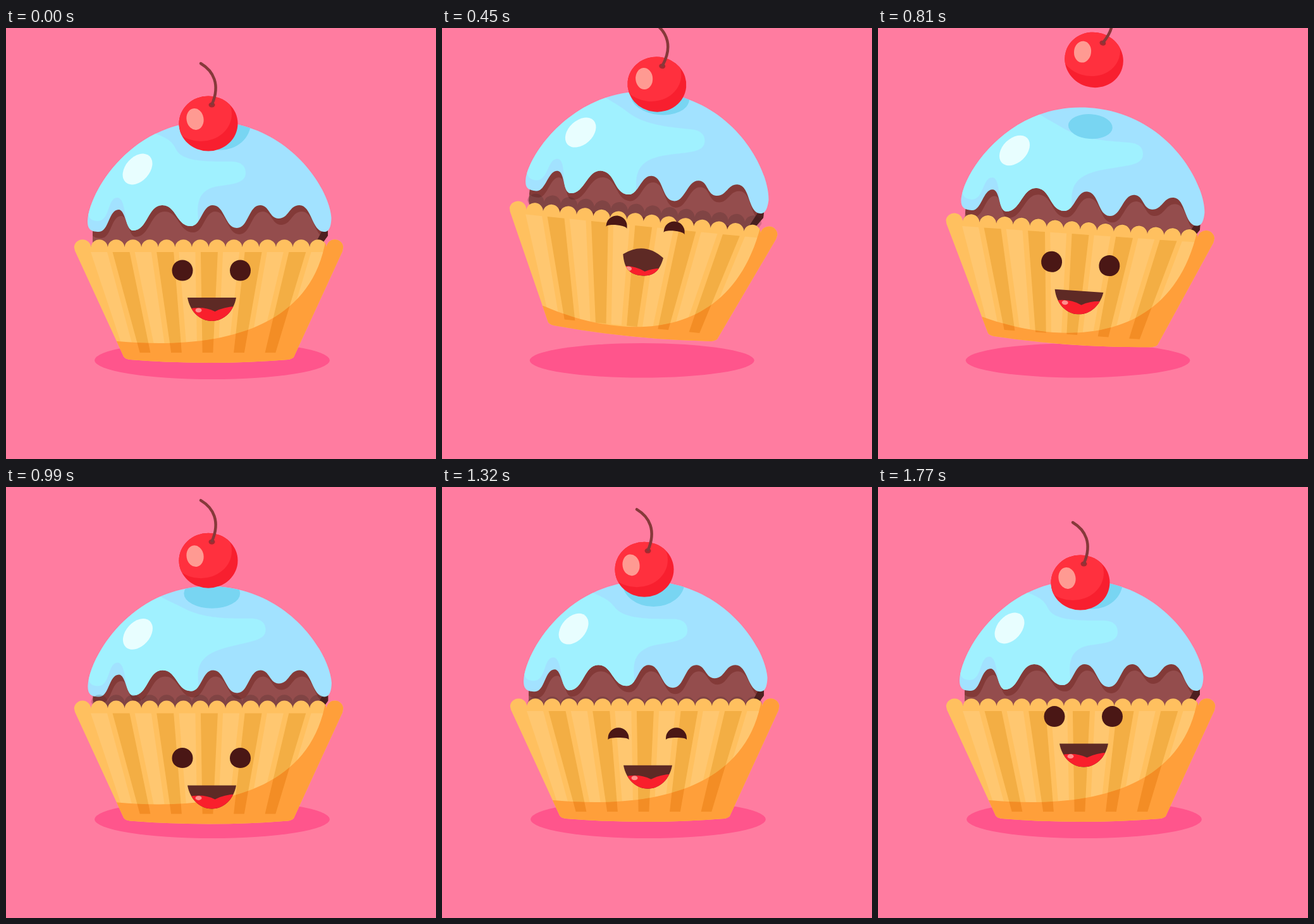
An HTML page for the animation above (1800 ms loop, 680x681 px).

```html
<!DOCTYPE html>
<html lang="en">
<head>
<meta charset="utf-8">
<title>Jumping cupcake</title>
<style>
html, body { margin: 0; width: 100%; height: 100%; overflow: hidden; background: #ff7ca0; }
svg { display: block; width: 100vw; height: 100vh; }
</style>
</head>
<body>
<svg viewBox="0 0 680 681" preserveAspectRatio="none">
  <defs>
    <path id="icing"/>
    <path id="cake" d="M137 305L165 270H480L509 305V328L463 394L444 425H170L152 386L137 338Z"/>
    <clipPath id="inIcing"><use href="#icing"/></clipPath>
    <clipPath id="inCake"><use href="#cake"/></clipPath>
    <clipPath id="inCup"><path class="cupShape"/></clipPath>
    <clipPath id="inShade"><path class="shadeShape"/></clipPath>
    <clipPath id="inMouth"><path class="mouthShape"/></clipPath>
    <clipPath id="inCherry"><ellipse rx="46.5" ry="43.5"/></clipPath>
  </defs>
  <rect width="680" height="681" fill="#ff7ca0"/>
  <ellipse id="ground" fill="#ff558c"/>
  <g id="jump">
    <g id="top">
      <use href="#cake" fill="#944d4d"/>
      <g clip-path="url(#inCake)">
        <use href="#icing" fill="#833a38" x="4" y="10"/>
        <path d="M501 318H520V425H425L478 362Z" fill="#4e2020"/>
      </g>
      <use href="#icing" fill="#a2e2ff"/>
      <g clip-path="url(#inIcing)">
        <path id="gloss" fill="#a0f1ff"/>
        <ellipse id="dent" fill="#78d5f2"/>
      </g>
      <ellipse rx="19" ry="28" transform="translate(208 223) rotate(42)" fill="#e8feff"/>
    </g>
    <g id="print">
      <path id="printShape" fill="#2c1c1c" opacity=".19"/>
      <path class="darkStripes" fill="#500c10" opacity=".32"/>
    </g>
    <path class="cupShape" fill="#ffc05f"/>
    <g clip-path="url(#inCup)">
      <path id="lightStripes" fill="#ffc770"/>
      <path class="darkStripes" fill="#f3ae44"/>
      <path class="shadeShape" fill="#ff9f3a"/>
      <g clip-path="url(#inShade)"><path class="darkStripes" fill="#f38d25"/></g>
    </g>
    <g id="cherry">
      <ellipse rx="46.5" ry="43.5" fill="#f81f2f"/>
      <g clip-path="url(#inCherry)">
        <ellipse cx="-12" cy="-15" rx="49" ry="43" fill="#ff303e"/>
      </g>
      <ellipse cx="-21" cy="-7" rx="13.5" ry="17" transform="rotate(-10 -21 -7)" fill="#ff9a92"/>
      <ellipse cx="5.5" cy="-29.5" rx="5" ry="4" fill="#a52a30"/>
      <path d="M-12 -95C8 -83 19 -62 6 -31" fill="none" stroke="#86393a" stroke-width="4.5" stroke-linecap="round"/>
    </g>
    <g id="face">
      <path class="eye" transform="translate(279 383)" fill="#4a1715"/>
      <path class="eye" transform="translate(370.5 383)" fill="#4a1715"/>
      <g transform="translate(325.5 426)">
        <path class="mouthShape" fill="#5e2a25"/>
        <g clip-path="url(#inMouth)">
          <g id="tongue">
            <path d="M-40 19Q-16 12 5 22Q20 14 40 14V44H-40Z" fill="#f91f2c"/>
            <ellipse cx="-21" cy="20" rx="5" ry="3.5" fill="#ff8f8c"/>
          </g>
        </g>
      </g>
    </g>
  </g>
</svg>
<script>
const LOOP = 1800, STEP = 30;
const byId = id => document.getElementById(id);
const set = (id, attrs) => Object.entries(attrs).forEach(([k, v]) => byId(id).setAttribute(k, v));
const setAll = (cls, d) => document.querySelectorAll('.' + cls).forEach(el => el.setAttribute('d', d));
const move = (id, x, y, turn = 0) => set(id, { transform: `translate(${x} ${y}) rotate(${turn})` });

// Easing from 0 to 1 between two times, and the hills built from it.
function rise(t, from, to) {
  const u = Math.min(1, Math.max(0, (t - from) / (to - from)));
  return u * u * (3 - 2 * u);
}
const plateau = (t, a, b, c, d) => rise(t, a, b) * (1 - rise(t, c, d));
const pulse = (t, a, peak, b) => plateau(t, a, peak, peak, b);
const bounce = (t, mid, half) => Math.max(0, 1 - ((t - mid) / half) ** 2);

// Dome closed by a wavy edge that swings between drips and gaps.
function icingPath() {
  const edge = [[503, 322], [464, 280], [431, 301], [402, 280], [365, 316], [327, 280],
    [292, 313], [247, 280], [201, 320], [178, 287], [147, 322]];
  let d = 'M129 305C131 260 197 147.5 321 147.5C444 147.5 511 251 514.5 300C514 318 509 322 503 322';
  edge.slice(1).forEach(([x, y], i) => {
    const [px, py] = edge[i], mid = (x + px) / 2;
    d += `C${mid} ${py} ${mid} ${y} ${x} ${y}`;
  });
  return d + 'C134 322 129 318 129 305Z';
}

const scallops = count => 'a13.4 13.4 0 0 1 26.6 0'.repeat(count);

// Evenly spaced pleats that converge towards the base.
function stripes(first, count, half) {
  const low = x => 318 + (x - 320) * .71;
  let d = '';
  for (let i = 0; i < count; i++) {
    const x = first + i * 69.7;
    d += `M${x - half} 354H${x + half}L${low(x) + half * .62} 513H${low(x) - half * .62}Z`;
  }
  return d;
}

set('icing', { d: icingPath() });
set('printShape', { d: `M134.3 346${scallops(14)}L462 425H178Z` });
set('lightStripes', { d: stripes(147, 6, 13) });
setAll('darkStripes', stripes(182, 5, 13.5));
setAll('cupShape', `M107.7 346${scallops(16)}L532 353L455 520Q452 523 446 524Q321 534 196 524Q188 523 186 519L109 352Z`);

function drawBodies(t, lift) {
  const shrink = pulse(t, 330, 600, 980) ** 2;
  set('ground', { cx: 326 - 56 * shrink, cy: 525 + 1.5 * shrink, rx: 186 - 49 * shrink, ry: 30 - 16 * shrink });

  const x = 320 - 11.5 * lift ** 2.6, y = 344 - 86 * lift + 4 * pulse(t, 900, 1020, 1160);
  set('jump', { transform: `translate(${x} ${y}) rotate(${12.1 * lift}) translate(-320 -344)` });

  const icing = 6 * pulse(t, 0, 210, 400) - 57 * pulse(t, 410, 600, 780) + 6 * plateau(t, 720, 810, 1170, 1380);
  move('top', .07 * icing, icing);
  move('print', 0, -46 * pulse(t, 360, 600, 810) - 16 * pulse(t, 760, 1170, 1380));

  const tilt = 13 * pulse(t, 480, 800, 960);
  const height = 176 * pulse(t, 390, 660, 930) + 78 * bounce(t, 1140, 210);
  move('cherry', 320 + .3 * tilt, 151 - height, tilt);
}

function drawShading(t, lift) {
  const air = plateau(t, 300, 510, 930, 1530), far = plateau(t, 390, 600, 810, 1100);
  const dx = 32 * air, dy = -13 * air, tip = 379 + dx, mid = 229 + dy;
  set('gloss', { d: `M${215 + dx / 2} 155C${240 + dx / 2} 172 258 170 ${268 + dx / 2} ${190 + dy / 2}
    C${tip - 104} ${mid - 22} ${tip - 79} ${mid - 18} ${tip - 39} ${mid - 18}H${tip - 24}
    C${tip - 7} ${mid - 18} ${tip} ${mid - 11} ${tip} ${mid}
    C${tip} ${mid + 17} ${tip - 24} ${mid + 18} ${335 + dx / 2} ${250 + dy / 2}
    C310 254 300 270 304 300V330H195C188 300 188 268 176 268C160 268 165 305 145 305C135 305 130 300 129 290L110 140Z` });
  set('dent', { cx: 338 - 13 * air, cy: 150 + 27 * far, rx: 49 - 14 * far, ry: 43 - 18 * air - 5.5 * far });

  const sag = Math.sqrt(lift);
  setAll('shadeShape', `M160 494L177 495C${320 - 20 * sag} ${508 + 42 * sag} ${487 - 7 * sag} ${485 + 60 * sag} 507 325H560V560H160Z`);
}

function drawFace(t) {
  move('face', 0, 41 * rise(t, 0, 240) - 106 * rise(t, 240, 600) + 107 * rise(t, 600, 905)
    - 72 * rise(t, 1140, 1560) + 12 * rise(t, 1620, 1830));

  const squint = plateau(t, 60, 420, 480, 585) + plateau(t, 930, 1380, 1590, 1740);
  const corner = 3 * squint, belly = 22 - 25 * squint;
  setAll('eye', `M-16.5 ${corner}V0A16.5 16.5 0 0 1 16.5 0V${corner}C16.5 ${belly} -16.5 ${belly} -16.5 ${corner}Z`);

  const gape = plateau(t, 300, 420, 480, 585), w = 38.5 - 6.5 * gape, depth = 37 - 6 * gape;
  setAll('mouthShape', `M${-w} 0Q0 ${-24 * gape} ${w} 0C${w - 4} 22 19 ${depth} 0 ${depth}C-19 ${depth} ${4 - w} 22 ${-w} 0Z`);
  move('tongue', 0, 2 * gape);
}

function draw(t) {
  const lift = pulse(t, 310, 600, 940);
  drawBodies(t, lift);
  drawShading(t, lift);
  drawFace(t);
}

const start = performance.now();
function tick() {
  const t = (performance.now() - start) % LOOP;
  draw(Math.floor(t / STEP) * STEP);
  requestAnimationFrame(tick);
}
tick();
</script>
</body>
</html>
```
